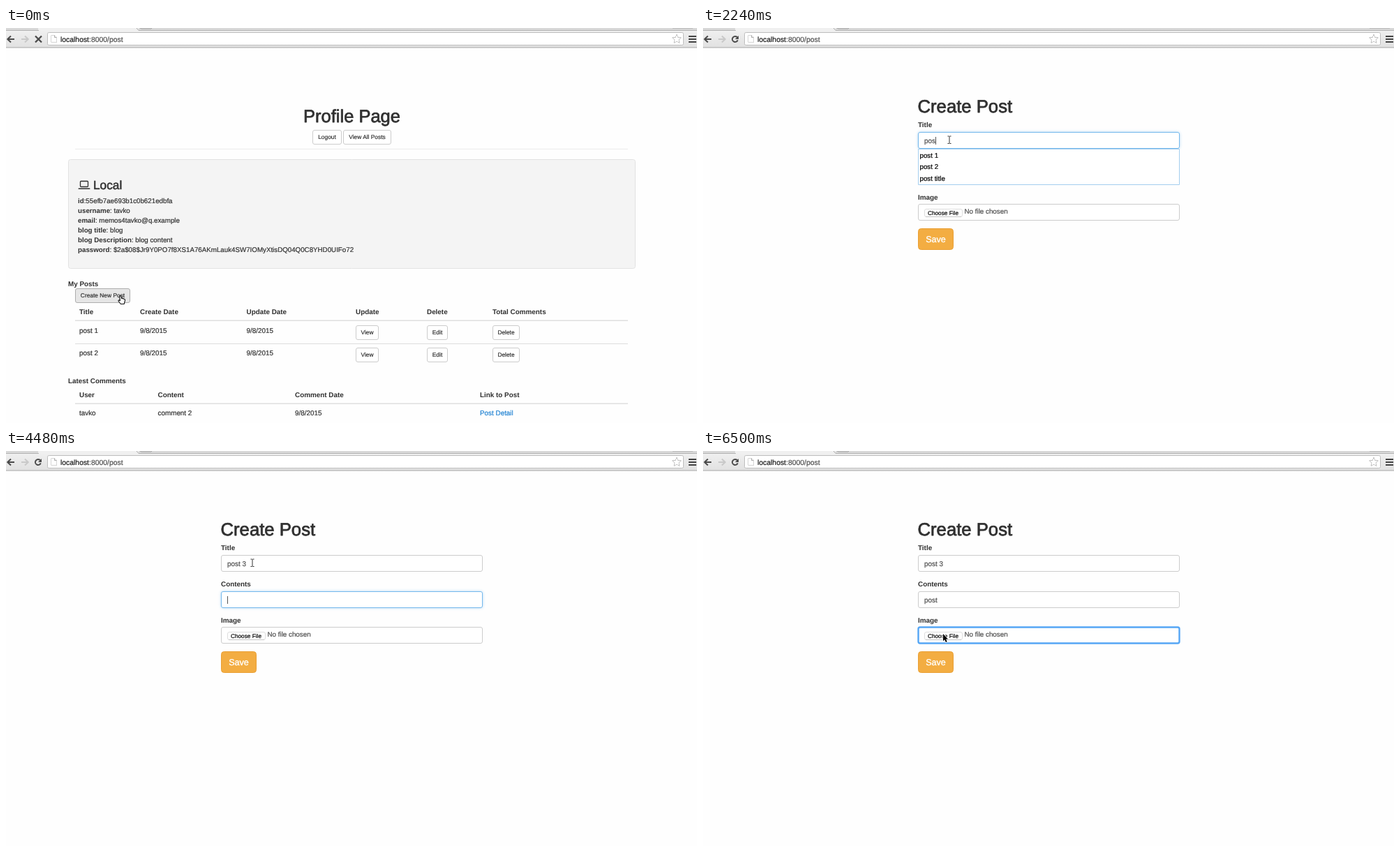
An HTML page with a canvas that plays this animation: 990x566 px, repeating every 8 s.

```html
<!DOCTYPE html>
<html lang="en">
<head>
<meta charset="utf-8">
<title>Create Post</title>
<style>
html, body { margin: 0; width: 100%; height: 100%; overflow: hidden; background: #fefefe; }
canvas { display: block; }
</style>
</head>
<body>
<canvas id="stage" width="990" height="566"></canvas>
<script>
const ctx = document.getElementById('stage').getContext('2d');
const LOOP = 8000;
const BODY = 9.9, SMALL = 8.4, INK = '#303030';
const FONT = '"Liberation Sans", Arial, sans-serif';

const TITLES = ['post 1', 'post 2', 'post title'];
const CONTENTS = ['post 1', 'post 1 content', 'post 2', 'post conetnt'];

// Each step changes only the listed parts of the form state.
const STEPS = [
  { at: 0, page: 'profile', cursor: ['hand', 160.5, 383] },
  { at: 300, page: 'form', title: '', contents: '', focus: '', caret: true, list: [], cursor: ['arrow', 277, 196] },
  { at: 920, cursor: ['beam', 353, 160] },
  { at: 1550, focus: 'title' },
  { at: 1880, caret: false },
  { at: 2240, caret: true, title: 'pos', list: TITLES },
  { at: 2590, title: 'post ' },
  { at: 2980, title: 'post 23', list: [] },
  { at: 3400, title: 'post 2', list: ['post 2'] },
  { at: 3880, title: 'post 3', list: [] },
  { at: 4480, focus: 'contents' },
  { at: 5040, contents: 'post ', list: CONTENTS },
  { at: 5760, focus: 'image', list: [], cursor: ['arrow', 284, 283] },
  { at: 6500, cursor: ['arrow', 344, 262] }
];

function stateAt(time) {
  return Object.assign({}, ...STEPS.filter(step => step.at <= time));
}

// Text is placed by the middle of its capitals; a thin outline sets its weight.
function text(str, x, midY, { size = BODY, color = INK, bold = false, align = 'left', heavy = 0.2 } = {}) {
  ctx.font = `${bold ? 'bold ' : ''}${size}px ${FONT}`;
  ctx.textAlign = align;
  ctx.fillStyle = ctx.strokeStyle = color;
  ctx.lineWidth = heavy;
  const y = midY + size * 0.355;
  ctx.fillText(str, x, y);
  if (!bold) ctx.strokeText(str, x, y);
  return ctx.measureText(str).width;
}

function box(x, y, w, h, r, fill, stroke, lineWidth = 1) {
  ctx.beginPath();
  ctx.roundRect(x + 0.5, y + 0.5, w - 1, h - 1, r);
  if (fill) { ctx.fillStyle = fill; ctx.fill(); }
  if (stroke) { ctx.strokeStyle = stroke; ctx.lineWidth = lineWidth; ctx.stroke(); }
}

function rect(x, y, w, h, color) {
  ctx.fillStyle = color;
  ctx.fillRect(x, y, w, h);
}

function path(points, { stroke, fill, width = 1, close = false }) {
  ctx.beginPath();
  points.forEach(([x, y]) => ctx.lineTo(x, y));
  if (close) ctx.closePath();
  if (stroke) { ctx.strokeStyle = stroke; ctx.lineWidth = width; ctx.stroke(); }
  if (fill) { ctx.fillStyle = fill; ctx.fill(); }
}

function button(label, x, y, w, fill = '#fff', border = '#ccc') {
  box(x, y, w, 21, 2.5, fill, border);
  text(label, x + w / 2, y + 10.5, { size: SMALL, align: 'center' });
}

function navArrow(x, dir, color) {
  path([[x - dir * 5, 16], [x + dir * 5, 16]], { stroke: color, width: 2 });
  path([[x, 11.5], [x + dir * 4.8, 16], [x, 20.5]], { stroke: color, width: 2 });
}

function reloadIcon() {
  ctx.beginPath();
  ctx.arc(46, 16, 4, 0.35, Math.PI * 1.78);
  ctx.strokeStyle = '#4a4a4a';
  ctx.lineWidth = 2;
  ctx.stroke();
  path([[51, 11], [51, 16], [46, 16]], { fill: '#4a4a4a', close: true });
}

function star(cx, cy, r) {
  const points = Array.from({ length: 10 }, (_, i) => {
    const a = i * Math.PI / 5 - Math.PI / 2, d = i % 2 ? r * 0.42 : r;
    return [cx + d * Math.cos(a), cy + d * Math.sin(a)];
  });
  path(points, { stroke: '#8c8c8c', fill: '#fff', close: true });
}

function toolbar(loading) {
  const shade = ctx.createLinearGradient(0, 3, 0, 28);
  shade.addColorStop(0, '#f0f0f0');
  shade.addColorStop(1, '#e1e1e1');
  rect(0, 0, 990, 28, shade);
  rect(0, 0, 46, 3, '#d8d8d8');
  rect(190, 0, 800, 3, '#d8d8d8');
  rect(0, 3, 47, 1, '#b3b3b3');
  rect(190, 3, 800, 1, '#b3b3b3');
  path([[187, 0], [190, 3.5]], { stroke: '#a9a9a9' });
  path([[192, 0], [194, 1], [208, 1], [209, 0]], { stroke: '#a0a0a0' });
  rect(955, 0, 29, 1, '#bcbcbc');
  rect(0, 27.5, 990, 1, '#a8a8a8');

  navArrow(7, -1, '#4a4a4a');
  navArrow(27, 1, '#c9c9c9');
  if (loading) {
    path([[42, 11.5], [51, 20.5]], { stroke: '#4a4a4a', width: 2.3 });
    path([[51, 11.5], [42, 20.5]], { stroke: '#4a4a4a', width: 2.3 });
  } else {
    reloadIcon();
  }
  box(59, 6, 912, 19, 2, '#fff', '#bdbdbd');
  path([[65, 10.5], [69.5, 10.5], [72.5, 13.5], [72.5, 20.5], [65, 20.5]], { stroke: '#aaa', fill: '#fff', close: true });
  path([[69.5, 10.5], [69.5, 13.5], [72.5, 13.5]], { stroke: '#aaa' });
  const hostWidth = text('localhost', 78, 16, { size: 10.4, color: '#1c1c1c' });
  text(':8000/post', 78 + hostWidth, 16, { size: 10.4, color: '#4c4c4c' });
  star(961, 16, 6.5);
  [11, 15, 19].forEach(y => rect(978, y, 11, 2, '#444'));
}

function field(name, value, x, y) {
  const size = 9.75;
  const width = text(name, x, y, { size, bold: true });
  text(value, x + width, y, { size });
}

function tableRow(cells, columns, y, bold) {
  cells.forEach((cell, i) => text(cell, columns[i], y, { bold }));
}

function profilePage() {
  text('Profile Page', 495.5, 126, { size: 25.5, align: 'center', heavy: 0.75 });
  button('Logout', 439, 146, 42);
  button('View All Posts', 483, 146, 69);
  rect(99, 173, 792, 1, '#ebebeb');

  box(89, 188, 813, 157, 3, '#f4f4f4', '#e2e2e2');
  box(106, 219, 12, 9, 1, null, INK, 1.3);
  box(103, 229, 18, 2.5, 1, INK);
  text('Local', 125, 225, { size: 17.3, heavy: 0.5 });
  [
    ['id', ':55efb7ae693b1c0b621edbfa'],
    ['username', ': tavko'],
    ['email', ': memos4tavko@q.example'],
    ['blog title', ': blog'],
    ['blog Description', ': blog content'],
    ['password', ': $2a$08$Jr9Y0PO7f8XS1A76AKmLauk4SW7IOMyXtisDQ04Q0C8YHD0UIFo72']
  ].forEach(([name, value], i) => field(name, value, 103, 247.5 + i * 13.95));

  text('My Posts', 89, 366, { bold: true });
  button('Create New Post', 99, 373, 79, '#e6e6e6', '#adadad');
  const postColumns = [105, 192, 344.5, 501, 603, 697];
  tableRow(['Title', 'Create Date', 'Update Date', 'Update', 'Delete', 'Total Comments'], postColumns, 406, true);
  rect(99, 418.5, 792, 1.4, '#ddd');
  [0, 1].forEach(i => {
    const y = 433 + i * 32.5;
    tableRow([`post ${i + 1}`, '9/8/2015', '9/8/2015'], postColumns, y);
    const top = Math.round(y - 7.5);
    button('View', 501, top, 33);
    button('Edit', 603, top, 30);
    button('Delete', 697, top, 39);
  });
  rect(99, 452, 792, 1, '#ddd');

  text('Latest Comments', 89, 505.5, { bold: true });
  const commentColumns = [105, 217.5, 414, 679];
  tableRow(['User', 'Content', 'Comment Date', 'Link to Post'], commentColumns, 525, true);
  rect(99, 537.5, 792, 1.4, '#ddd');
  tableRow(['tavko', 'comment 2', '9/8/2015'], commentColumns, 551.5);
  text('Post Detail', 679, 551.5, { color: '#1f82d2' });
}

function input(y, focused) {
  if (focused) {
    ctx.save();
    ctx.shadowColor = 'rgba(102,175,233,.6)';
    ctx.shadowBlur = 4;
    box(308, y, 375, 24, 2.5, '#fff');
    ctx.restore();
  }
  box(308, y, 375, 24, 2.5, '#fff', focused ? '#74b8ec' : '#ccc');
}

function textInput(label, value, y, focused, caret) {
  text(label, 308, y - 10.5, { bold: true });
  input(y, focused);
  const width = text(value, 317, y + 12, { color: '#4c4c4c' });
  if (focused && caret) rect(Math.round(317 + width), y + 7, 1, 11, '#555');
}

function suggestions(items, y) {
  if (!items.length) return;
  box(308, y, 375, Math.round(items.length * 16.7 + 1.5), 0, '#fff', '#a3cdee');
  items.forEach((item, i) => text(item, 310.5, y + 9.2 + i * 16.7, { size: 9.75, color: '#000' }));
}

function formPage(state) {
  const { focus } = state;
  text('Create Post', 307.5, 112, { size: 25.7, heavy: 0.75 });
  textInput('Title', state.title, 149, focus === 'title', state.caret);
  textInput('Contents', state.contents, 201, focus === 'contents', state.caret);

  text('Image', 308, 242, { bold: true });
  input(252, false);
  if (focus === 'image') box(308, 252, 375, 24, 2.5, null, '#55a6f5', 2.4);
  box(317, 259, 55, 12, 2.5, '#fff', '#ddd');
  rect(319, 270, 51, 1, '#c4c4c4');
  text('Choose File', 344, 265, { size: 8.25, color: '#000', align: 'center' });
  text('No file chosen', 374.5, 263, { size: 9.8, color: '#4c4c4c' });

  box(308, 287, 51, 31, 4, '#f3ad42', '#eaa035');
  text('Save', 333.5, 302.5, { size: 12.6, color: '#fff', align: 'center', heavy: 0.35 });
  suggestions(state.list, focus === 'title' ? 173 : 225);
}

const CURSORS = {
  arrow() {
    const shape = [[0, 0], [0, 10.2], [2.2, 8.2], [3.9, 12], [5.7, 11.2], [4.1, 7.5], [7, 7.5]];
    path(shape, { stroke: '#fff', width: 1.6, fill: '#000', close: true });
  },
  beam() {
    rect(-0.5, -5, 1, 10.5, '#333');
    [-5.5, 5].forEach(y => {
      rect(-2.5, y, 2, 1, '#333');
      rect(0.5, y, 2, 1, '#333');
    });
  },
  hand() {
    ctx.beginPath();
    ctx.moveTo(2, 1.6);
    ctx.quadraticCurveTo(3, -0.2, 4.2, 1.5);
    ctx.lineTo(5, 4.4);
    ctx.quadraticCurveTo(6.4, 3.6, 7, 4.9);
    ctx.quadraticCurveTo(8.2, 4.3, 8.7, 5.5);
    ctx.quadraticCurveTo(10.2, 5.2, 10, 7.4);
    ctx.lineTo(8.7, 12.5);
    ctx.lineTo(3.8, 12.5);
    ctx.lineTo(0.4, 8);
    ctx.quadraticCurveTo(0.6, 6, 3, 7.7);
    ctx.closePath();
    ctx.fillStyle = '#fff';
    ctx.fill();
    ctx.strokeStyle = '#111';
    ctx.lineWidth = 1.1;
    ctx.stroke();
  }
};

function drawCursor([kind, x, y]) {
  ctx.save();
  ctx.translate(x, y);
  CURSORS[kind]();
  ctx.restore();
}

function render(now) {
  const state = stateAt(now % LOOP);
  const profile = state.page === 'profile';
  ctx.textRendering = 'geometricPrecision';
  ctx.lineJoin = 'round';
  rect(0, 0, 990, 566, '#fefefe');
  toolbar(profile);
  if (profile) profilePage();
  else formPage(state);
  drawCursor(state.cursor);
}

const start = performance.now();
function tick() {
  render(performance.now() - start);
  requestAnimationFrame(tick);
}
tick();
</script>
</body>
</html>
```
